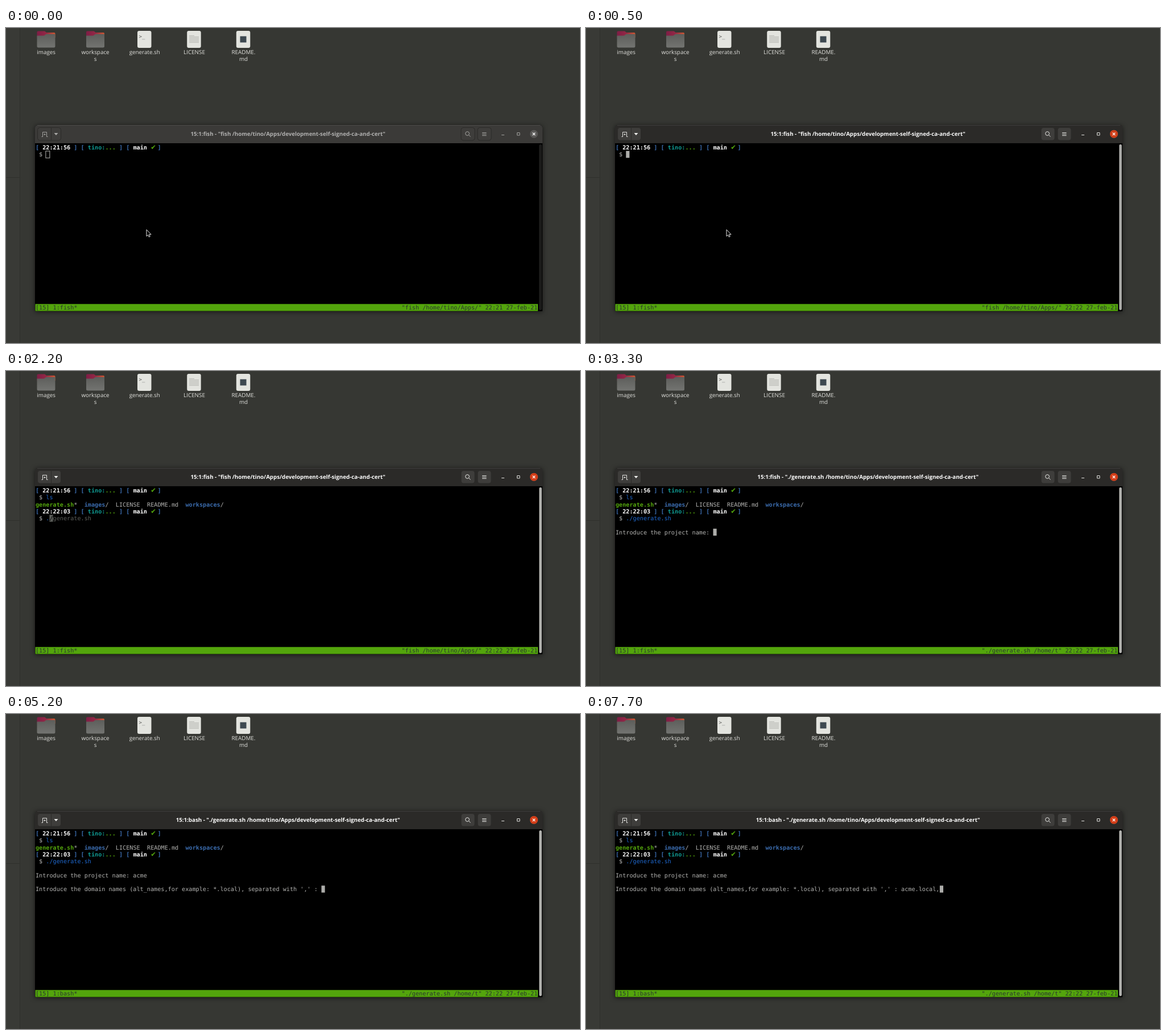
Write an HTML page that moves like this. It is 1009 px wide and 555 px high and loops after 8000 ms.

```html
<!DOCTYPE html>
<html lang="en">
<head>
<meta charset="utf-8">
<title>Terminal session</title>
<style>
  html, body { margin: 0; width: 100%; height: 100%; overflow: hidden; background: #363733; }
  svg { display: block; }
  text { text-rendering: geometricPrecision; white-space: pre; }
  .label { font: 9.85px "Open Sans", "Noto Sans", sans-serif; fill: #e0e0dc; text-anchor: middle; }
  .title { font: bold 9.73px "Open Sans", "Noto Sans", sans-serif; fill: #fff; text-anchor: middle; }
  .mono { font: 10.18px "DejaVu Sans Mono", "Liberation Mono", monospace; fill: #b4b4b2; }
  .bold { font-weight: bold; }
  .tick { font: 11.5px "DejaVu Sans", sans-serif; }
  .line { fill: none; stroke: #e6e6e3; stroke-width: 1; }
  .button { fill: #3e3d3b; stroke: #2b2a28; }
</style>
</head>
<body>
<svg width="1009" height="555" viewBox="0 0 1009 555">
  <defs>
    <linearGradient id="back">
      <stop offset="0" stop-color="#7f1d46"/>
      <stop offset=".5" stop-color="#932845"/>
      <stop offset="1" stop-color="#cf5a30"/>
    </linearGradient>
    <linearGradient id="front" x2="0" y2="1">
      <stop offset="0" stop-color="#5d5e5b"/>
      <stop offset="1" stop-color="#737471"/>
    </linearGradient>
    <g id="folder">
      <path d="M0 8V2.500Q0 .5 2 .5H13.500L16.500 3H30Q32 3 32 5V12H0Z" fill="url(#back)"/>
      <path d="M0 8.500H12.500L16 5.800H32V27Q32 29.500 29.500 29.500H2.500Q0 29.500 0 27Z" fill="url(#front)"/>
    </g>
    <rect id="sheet" width="24.500" height="30" rx="3" fill="#e3e4df"/>
    <path id="bar" d="M51 203V176Q51 171 56 171H938Q943 171 943 176V203Z"/>
  </defs>

  <!-- desktop -->
  <rect width="24" height="555" fill="#393a36"/>
  <path d="M24.500 0V555M0 263.500H24" stroke="#2f302c"/>
  <use href="#folder" x="54.500" y="5"/>
  <use href="#folder" x="141" y="5"/>
  <use href="#sheet" x="231" y="5"/>
  <use href="#sheet" x="318.200" y="5"/>
  <use href="#sheet" x="404.800" y="5"/>
  <text class="mono" x="233.500" y="18" style="font-size:9px;fill:#5c5d5a">&gt;_</text>
  <path d="M322 13.500H331M322 15.500H339M322 17.500H339M322 19.500H339M322 21.500H339M322 23.500H339M322 25.500H339"
        stroke="#b8b9b4"/>
  <rect x="411.500" y="14.500" width="11" height="11" fill="#3d4850"/>
  <g id="labels"></g>

  <!-- window -->
  <path d="M51 499V176Q51 171 56 171H938Q943 171 943 176V499Z" fill="#000"
        style="filter:drop-shadow(0 1.500px 4px rgba(0,0,0,.6))"/>
  <use href="#bar" fill="#3b3a38"/>
  <use id="header" href="#bar" fill="#2b2a28"/>
  <path d="M55 171.500H939" stroke="#fff" opacity=".09"/>
  <rect class="button" x="55.500" y="175.500" width="41" height="22.500" rx="4"/>
  <path d="M79.500 175.500V198" stroke="#2b2a28"/>
  <rect class="button" x="800" y="175.500" width="24" height="22.500" rx="4"/>
  <rect class="button" x="829" y="175.500" width="24" height="22.500" rx="4"/>
  <g id="chrome">
    <path class="line" d="M62.500 191.500H64.500V183.500H71.500V191.500H73.500M66.500 187.500H69.500M68 186V189"/>
    <path d="M84.500 185H91.500L88 189Z" fill="#f0f0ee"/>
    <circle class="line" cx="811" cy="186" r="3.400"/>
    <path class="line" d="M813.500 188.500L816.500 191.500M837 184.500H844.500M837 187H844.500M837 189.500H844.500"/>
    <path class="line" d="M871 188.500H876M898.500 184.500H903V189H898.500Z"/>
    <text class="title" id="title" x="495.700" y="190.300"></text>
  </g>
  <circle cx="928" cy="186.800" r="7" fill="#595856"/>
  <circle id="close" cx="928" cy="186.800" r="7" fill="#d43d17"/>
  <path d="M925.700 184.500L930.300 189.100M930.300 184.500L925.700 189.100" stroke="#fff" stroke-width="1.300"/>
  <rect x="937" y="205" width="5" height="292" rx="2.500" fill="#1b1b1a"/>
  <rect id="scroll" x="937.300" y="205" width="4.500" height="292" rx="2.250" fill="#b2b2af"/>
  <rect x="51.500" y="486.300" width="883.500" height="12.300" fill="#53a50c"/>
  <g id="term"></g>
  <path id="pointer" d="M247 355.300V367L249.600 364.600L251.300 368.200L253.200 367.300L251.500 363.800H255.100Z"
        fill="#000" stroke="#fff" stroke-width=".9"/>
</svg>
<script>
const $ = id => document.getElementById(id);
const LOOP = 8000;
const CELL = { x: 51.9, y: 204.2, w: 6.129, h: 12.27 };
const USER = 'tino';
const DIR = `/home/${USER}/Apps/development-self-signed-ca-and-cert`;
const GREY = '#b4b4b2', BLUE = '#3b6cae', GREEN = '#53a50c', TEAL = '#0f9a92',
      CMD = '#1f69d0', HINT = '#5c5e5a', WHITE = '#fff', INK = '#2a3430';
const SCRIPT = './generate.sh';
const RUN = `"${SCRIPT} /home/${USER[0]}"`;

const initial = {
  focus: 0, cursor: [1, 3], pointer: true, shell: 'fish', job: 'fish', clock: '22:21',
  task: `"fish /home/${USER}/Apps/"`, first: '', listed: false,
  second: '', hint: '', name: null, domain: null
};

// Each step changes part of the state at its time in ms.
const steps = [
  [0, {}],
  [400, { focus: .45 }],
  [500, { focus: .96, clock: '22:22' }],
  [600, { focus: 1 }],
  [1000, { cursor: null }],
  [1700, { first: 'l', hint: 's', cursor: [1, 4], pointer: false }],
  [1900, { first: 'ls', hint: '', cursor: [1, 5] }],
  [2000, { job: 'ls', cursor: null }],
  [2200, { job: 'fish', listed: true, second: '.', hint: SCRIPT.slice(1), cursor: [4, 4] }],
  [2500, { second: './', hint: SCRIPT.slice(2), cursor: [4, 5] }],
  [3000, { second: SCRIPT, hint: '', cursor: [4, 16] }],
  [3300, { job: SCRIPT, task: RUN, name: '', cursor: [6, 28] }],
  [3700, { name: 'a', cursor: [6, 29], shell: 'bash' }],
  [3800, { name: 'ac', cursor: [6, 30] }],
  [3900, { name: 'acme', cursor: [6, 32] }],
  [4200, { domain: '', cursor: [8, 82] }],
  [4700, { cursor: null }],
  [5200, { cursor: [8, 82] }],
  ...[[5300, 2], [5500, 3], [5600, 4], [5800, 5], [6300, 6], [6500, 7],
      [6700, 8], [6800, 9], [6900, 10], [7700, 11]]
    .map(([ms, n]) => [ms, { domain: 'acme.local,'.slice(0, n), cursor: [8, 82 + n] }])
];

let last = initial;
const states = steps.map(([ms, patch]) => ({ ms, ...(last = { ...last, ...patch }) }));

const colX = col => CELL.x + col * CELL.w;
const rowY = row => CELL.y + row * CELL.h;

function put(row, col, str, fill = GREY, cls = '') {
  return `<text class="mono ${cls}" x="${colX(col)}" y="${rowY(row) + 9.8}" style="fill:${fill}">${str}</text>`;
}

function prompt(row, time) {
  const brackets = [[0, '['], [11, ']'], [13, '['], [24, ']'], [26, '['], [35, ']']];
  return brackets.map(([col, ch]) => put(row, col, ch, BLUE, 'bold')).join('') +
    put(row, 2, time, WHITE, 'bold') +
    put(row, 15, USER + ':', TEAL, 'bold') + put(row, 20, '...', GREEN, 'bold') +
    put(row, 28, 'main', WHITE, 'bold') + put(row, 33, '✔', GREEN, 'tick') +
    put(row + 1, 1, '$');
}

function command(row, typed, hint) {
  return put(row, 3, typed, CMD) + put(row, 3 + typed.length, hint, HINT);
}

function listing(row) {
  return put(row, 0, 'generate.sh', GREEN, 'bold') + put(row, 11, '*') +
    put(row, 14, 'images', BLUE, 'bold') + put(row, 20, '/') +
    put(row, 23, 'LICENSE') + put(row, 32, 'README.md') +
    put(row, 43, 'workspaces', BLUE, 'bold') + put(row, 53, '/');
}

function caret(s) {
  if (!s.cursor) return '';
  const [row, col] = s.cursor;
  const x = colX(col), y = rowY(row);
  if (s.focus === 0)
    return `<rect x="${x - .4}" y="${y + .3}" width="7" height="12.2" fill="none" stroke="#b8b8b5"/>`;
  const block = `<rect x="${x}" y="${y}" width="${CELL.w}" height="${CELL.h}" fill="${s.hint ? HINT : '#adadaa'}"/>`;
  return block + (s.hint ? put(row, col, s.hint[0], '#000') : '');
}

function draw(s) {
  let out = prompt(0, '22:21:56') + command(1, s.first, s.listed ? '' : s.hint);
  if (s.listed) out += listing(2) + prompt(3, '22:22:03') + command(4, s.second, s.hint);
  if (s.name !== null) out += put(6, 0, 'Introduce the project name: ' + s.name);
  if (s.domain !== null)
    out += put(8, 0, "Introduce the domain names (alt_names,for example: *.local), separated with ',' : " + s.domain);
  out += put(23, 0, `[15] 1:${s.shell}*`, INK) + put(23, 105, `${s.task} ${s.clock} 27-feb-21`, INK);
  $('term').innerHTML = out + caret(s);
  $('title').textContent = `15:1:${s.shell} - "${s.job} ${DIR}"`;
  for (const id of ['header', 'close', 'scroll']) $(id).setAttribute('opacity', s.focus);
  $('chrome').setAttribute('opacity', .6 + .4 * s.focus);
  $('pointer').setAttribute('visibility', s.pointer ? 'visible' : 'hidden');
}

$('labels').innerHTML = [
  [70.7, 46.3, 'images'], [157, 46.3, 'workspace'], [157, 58.2, 's'], [243.7, 46.3, 'generate.sh'],
  [331, 46.3, 'LICENSE'], [417.5, 46.3, 'README.'], [417.5, 58.2, 'md']
].map(([x, y, str]) => `<text class="label" x="${x}" y="${y}">${str}</text>`).join('');

const start = performance.now();
let shown = null;
function tick() {
  const t = (performance.now() - start) % LOOP;
  const state = states.findLast(s => s.ms <= t);
  if (state !== shown) draw(shown = state);
  requestAnimationFrame(tick);
}
tick();
</script>
</body>
</html>
```
